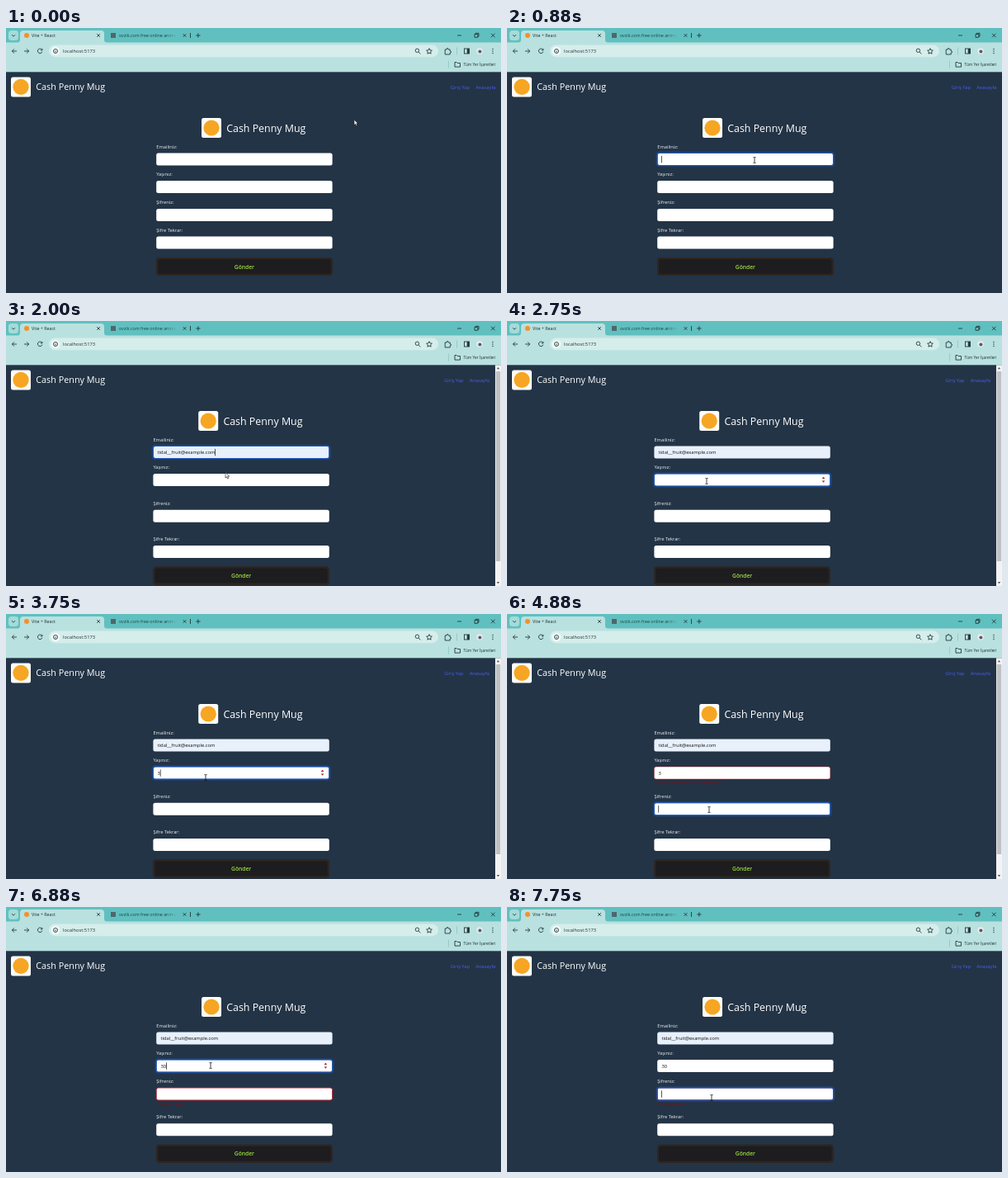
Recreate the animation shown at these times as an HTML page. Size 600x321 px, loop 8 s.

```html
<!DOCTYPE html>
<html lang="tr">
<head>
<meta charset="utf-8">
<style>
html, body { margin: 0; width: 100%; height: 100%; overflow: hidden; background: #233446; }
svg { display: block; width: 600px; height: 321px; font-family: "Open Sans", "Noto Sans", sans-serif; font-size: 5.75px; }
.line { fill: none; stroke: #24393b; stroke-width: .9; }
</style>
</head>
<body>
<svg viewBox="0 0 600 321">
  <defs>
    <linearGradient id="fade">
      <stop offset=".82" stop-color="#1c4245"/><stop offset="1" stop-color="#1c4245" stop-opacity="0"/>
    </linearGradient>
  </defs>
  <rect width="600" height="321" fill="#233446"/>
  <g id="page"></g>
  <g id="browser">
    <rect width="600" height="18" fill="#60c0bf"/>
    <rect y="17.5" width="600" height="35.8" fill="#b9e1df"/>
    <rect x="3" y="3" width="12" height="12" rx="3.5" fill="#a4dbd9"/>
    <path d="M13 18q4 0 4-4V7q0-4 4-4h94q4 0 4 4v7q0 4 4 4z" fill="#b9e1df"/>
    <circle cx="25" cy="9" r="3" fill="#f2912c"/>
    <rect x="127" y="6" width="6" height="6" fill="#50676a"/>
    <g font-size="5.35" fill="#1f3335">
      <text x="31" y="11">Vite + React</text>
      <text x="137" y="11" fill="url(#fade)">ovzik.com free online anima</text>
    </g>
    <path class="line" d="M7 8.2l2 2 2-2M110.3 7.2l3.6 3.6m0-3.6l-3.6 3.6M214.7 7.2l3.6 3.6m0-3.6l-3.6 3.6M223.5 6v6M230.2 9h5.4M232.9 6.3v5.4M547 9h5M568 7.5h3.8v3.8H568zM569.2 7.3v-1h3.8v3.8h-1M588 6.7l4.6 4.6m0-4.6l-4.6 4.6"/>
    <rect x="52" y="20.6" width="472" height="14.6" rx="7.3" fill="#d5eeec"/>
    <circle cx="60" cy="28" r="5.3" fill="#f2fbfa"/>
    <circle cx="60" cy="28" r="2.5" class="line"/>
    <path class="line" d="M60 27.5v1.8M13 28H7.4m2.5-2.6L7.3 28l2.6 2.6M22 28h5.6m-2.5-2.6l2.6 2.6-2.6 2.6M43.6 26.3a2.8 2.8 0 1 0 .3 2.4m0-3.7v2h-2M500.2 29.2l2.2 2.2"/>
    <circle cx="498.4" cy="27.3" r="2.2" class="line"/>
    <path class="line" d="M513 24.7l1 2.2 2.4.3-1.8 1.6.5 2.4-2.1-1.2-2.1 1.2.5-2.4-1.8-1.6 2.4-.3z"/>
    <path class="line" d="M532.2 26h2q0-1.6 1-1.6t1 1.6h2v2q1.4 0 1.4 1t-1.4 1v2h-6z"/>
    <path d="M546.5 23.5v9" stroke="#7fbdbb" stroke-width=".6"/>
    <rect x="555.5" y="25" width="6" height="6" class="line"/>
    <path d="M558.8 25h2.7v6h-2.7z" fill="#24393b"/>
    <circle cx="574" cy="28" r="3.7" fill="#e4eeee"/>
    <circle cx="574.4" cy="28.6" r="2" fill="#5e5a60"/>
    <g fill="#24393b"><circle cx="590" cy="25.5" r=".7"/><circle cx="590" cy="28" r=".7"/><circle cx="590" cy="30.5" r=".7"/></g>
    <text x="69" y="30.1" font-size="5.8" fill="#1f3335">localhost:5173</text>
    <path d="M536.5 39.5v9" stroke="#7fbdbb" stroke-width=".6"/>
    <path class="line" d="M544 41.5h2.2l.9 1h3.4v4.6H544z"/>
    <text x="554.5" y="46.2" font-size="4.8" fill="#1f3335">Tüm Yer İşaretleri</text>
  </g>
  <g id="cursor"></g>
</svg>
<script>
const LOOP = 8000, BRAND = "Cash Penny Mug", EMAIL = "tidal__fruit@example.com";
const page = document.getElementById("page"), cursor = document.getElementById("cursor");

// time, x, y of the pointer
const PATH = [[0, 422, 111], [130, 422, 111], [880, 300, 160], [1130, 300, 160], [1380, 297, 174],
  [1750, 297, 174], [2000, 266, 183.5], [2130, 266, 183.5], [2750, 242, 194], [3250, 242, 198],
  [4300, 242, 198], [4700, 245, 237], [5130, 245, 237], [5600, 248, 192], [6880, 248, 192],
  [7250, 248, 231], [LOOP, 248, 231]];

// start, field index of the focus
const FOCUS = [[0, -1], [880, 0], [2750, 1], [4630, 2], [5500, 1], [7250, 2]];
// start and end of each time the caret shows
const CARET = [[880, 1500], [1880, 2380], [2880, 3500], [3740, 4000], [4630, 5130], [5630, 6250], [6880, 7130], [7370, LOOP]];

const text = (x, y, s, fill = "#eef2f5", more = "") => `<text x="${x}" y="${y}" fill="${fill}" ${more}>${s}</text>`;
const box = (x, y, w, h, r, fill, more = "") =>
  `<rect x="${x}" y="${y}" width="${w}" height="${h}" rx="${r}" fill="${fill}" ${more}/>`;

function pointer(t) {
  const i = PATH.findIndex(k => k[0] > t);
  const [a, b] = [PATH[i - 1], PATH[i]];
  const u = (t - a[0]) / (b[0] - a[0]), e = u * u * (3 - 2 * u);
  return [a[1] + (b[1] - a[1]) * e, a[2] + (b[2] - a[2]) * e];
}

const logo = (x, y) => box(x, y, 24, 24, 2.5, "#fdfcf8") + `<circle cx="${x + 12}" cy="${y + 12}" r="9.6" fill="#f6a623"/>`;

function field(x, y, fill, focused, error) {
  let s = box(x, y, 213.4, 15, 2.5, fill);
  if (error) s += box(x, y, 213.4, 15, 2.5, "none", `stroke="#b3202c" stroke-opacity="${error}"`);
  if (focused) s += box(x - .6, y - .6, 214.6, 16.2, 3, "none", 'stroke="#1b4da6" stroke-opacity=".5" stroke-width="2.4"') +
    box(x, y, 213.4, 15, 2.5, "none", 'stroke="#2159b5" stroke-width="1.1"');
  return s;
}

function scrollbar() {
  return box(593, 53.3, 7, 267.7, 0, "#f3f3f3") + box(593.8, 61, 5.4, 230, 0, "#bfc1c3") +
    '<path d="M594.8 58.3l1.7-2.2 1.7 2.2zM594.8 316l1.7 2.2 1.7-2.2z" fill="#555"/>';
}

function draw(t) {
  const focus = FOCUS.filter(f => f[0] <= t).pop()[1];
  const filled = t >= 1880, adult = t >= 6880;
  const ageGap = filled && !adult ? 9.7 : 0, passGap = filled ? 9.7 : 0, scroll = ageGap > 0;
  const x = scroll ? 178.4 : 182.2, side = scroll ? -7.5 : 0;
  const tops = [151.5, 185, 219 + ageGap, 252.6 + ageGap + passGap];
  const fade = from => Math.max(0, Math.min(1, (t - from) / 300));
  const errors = [0, adult ? 0 : fade(4740), fade(5560), 0];
  const age = adult ? "30" : t >= 3740 ? "3" : "";

  let s = logo(6, 59.4) + text(36.3, 74.8, BRAND, "#fff", 'font-size="10.8" font-weight="500"') +
    text(538.7 + side, 74, "Giriş Yap", "#4d5df0") + text(569.2 + side, 74, "Anasayfa", "#4d5df0") +
    logo(x + 54.8, 109) + text(x + 85, 126.1, BRAND, "#fff", 'font-size="12.4" font-weight="500"');

  ["Emailiniz:", "Yaşınız:", "Şifreniz:", "Şifre Tekrar:"].forEach((label, i) => {
    const hinted = i == 0 && t >= 1250;
    s += text(x, tops[i] - 6, label) + field(x, tops[i], hinted ? "#e8f0fb" : "#fff", focus == i, errors[i]);
  });

  if (filled) s += text(x + 5.2, 161.1, EMAIL, "#111", 'font-size="5.8"');
  else if (t >= 1250) s += text(x + 5.2, 161, EMAIL, "#111", 'font-size="5.5" font-family="Liberation Sans, Arial, sans-serif"');
  s += text(x + 5.2, 194.8, age, "#111", 'font-size="5.8"');
  if (focus == 1) s += `<path d="M${x + 203.4} 191l1.8-2.2 1.8 2.2zm0 2.6l1.8 2.2 1.8-2.2z" fill="#a3202a"/>`;

  if (t >= 4740 && !adult) s += text(x + 2, 206.3, "Yaşınız minimum 18 olmalıdır!", "#8b0a12");
  if (t >= 5560) s += text(x + .6, tops[2] + 22.2, "Zorunlu alan", "#8b0a12", 'font-size="5.5"');

  if (focus >= 0 && CARET.some(([a, b]) => t >= a && t < b)) {
    const shift = focus == 0 && filled ? 69.6 : focus == 1 ? age.length * 3.4 : 0;
    s += box(x + 5 + shift, tops[focus] + 3.4, .7, 8.4, 0, "#111");
  }

  const by = 278 + ageGap + passGap;
  s += box(x, by, 213.4, 22, 4, "#1d1c1f") +
    box(x + 1, by + 1, 211.4, 20, 3.5, "none", 'stroke="#30261f" stroke-width="2"') +
    text(x + 106.7, by + 13.5, "Gönder", "#9fe03f", 'font-size="6.7" font-weight="600" text-anchor="middle"');
  if (scroll) s += scrollbar();
  page.innerHTML = s;

  const [px, py] = pointer(t);
  const typing = px > x && px < x + 213 && tops.some(y => py > y && py < y + 15);
  cursor.setAttribute("transform", `translate(${px} ${py})`);
  cursor.innerHTML = typing
    ? '<path d="M-1.6-3.4h1.2l.4.4.4-.4h1.2M0-3v6M-1.6 3.4h1.2l.4-.4.4.4h1.2" fill="none" stroke="#111" stroke-width=".8"/>'
    : '<path d="M0 0v6.6l1.5-1.4 1.1 2.4 1.2-.6-1.1-2.3h2z" fill="#fff" stroke="#111" stroke-width=".6"/>';
}

function tick(now) {
  draw(now % LOOP);
  requestAnimationFrame(tick);
}
draw(0);
requestAnimationFrame(tick);
</script>
</body>
</html>
```
